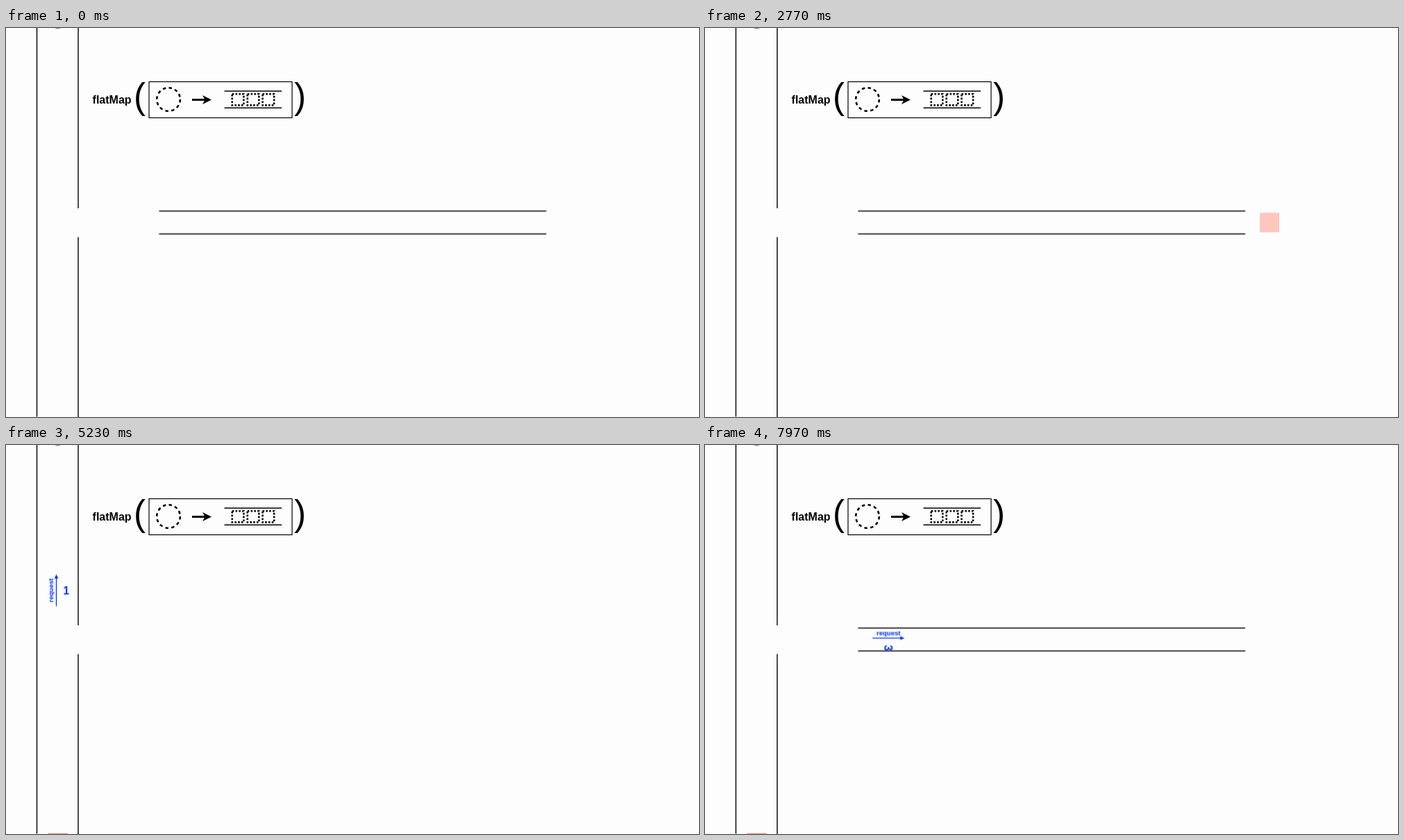
These frames come from a looping animation (998 px wide and 561 px high, 8 s). An HTML page:

```html
<!DOCTYPE html>
<html lang="en">
<head>
<meta charset="utf-8">
<title>flatMap</title>
<style>
  html, body { margin: 0; width: 100%; height: 100%; overflow: hidden; background: #fdfdfd; }
  svg { display: block; width: 998px; height: 561px; }
  text { font-family: "Liberation Sans", Arial, sans-serif; font-weight: bold; font-size: 16px; }
  .line { fill: none; stroke: #000; stroke-width: 1.4; }
  .dash { fill: none; stroke: #000; stroke-width: 2.6; }
  .paren { font-size: 51px; font-weight: normal; }
  .request { fill: #0433ff; text-anchor: middle; opacity: 0; }
  .request path { stroke: #0433ff; stroke-width: 1.3; }
  .request .label { font-size: 9.55px; }
  #square, #circle { opacity: 0; }
</style>
</head>
<body>
<svg viewBox="0 0 998 561">
  <defs>
    <g id="arrow">
      <path d="M0 23V-18" fill="none"/>
      <path d="M0 -23L2.8 -17H-2.8Z" style="stroke:none"/>
    </g>
    <rect id="slot" class="dash" x="0" y="95.2" width="16.6" height="16.2" stroke-dasharray="2.6 2.2"/>
  </defs>

  <path class="line" d="M44.5 0V560.5M104 0V260M104 301.5V561"/>
  <circle cx="74.5" cy="-13.2" r="14" fill="#333"/>

  <text x="124.6" y="109">flatMap</text>
  <text class="paren" x="183.9" y="116.4">(</text>
  <text class="paren" x="415" y="116.4">)</text>
  <rect class="line" x="206" y="77.5" width="206" height="52" style="stroke-width:1.2"/>
  <circle class="dash" cx="234" cy="103" r="16.8" stroke-dasharray="4.4 4.4"/>
  <path d="M268 103.5H288" fill="none" stroke="#000" stroke-width="3"/>
  <path d="M296 103.5L283 110L286.5 103.5L283 97Z"/>
  <path class="line" d="M314.5 91H397M314.5 115.3H397"/>
  <use href="#slot" x="325.7"/>
  <use href="#slot" x="347.7"/>
  <use href="#slot" x="369.5"/>

  <g id="pipe"><path class="line" d="M-278.8 -16.5H278.8M-278.8 16.5H278.8"/></g>
  <rect id="square" x="-14" y="-14" width="28" height="28" fill="#ff2600"/>
  <circle id="circle" r="14" fill="#0433ff"/>
</svg>

<script>
const LOOP = 8000;
const svg = document.querySelector('svg');
const find = id => document.getElementById(id);
const at = (x, y, extra = '') => `translate(${x}px, ${y}px) ${extra}`;

// Steps are [time in ms, value]; the first and last values are held.
function track(el, prop, steps) {
  const full = [[0, steps[0][1]], ...steps, [LOOP, steps.at(-1)[1]]];
  const frames = full.map(([t, v]) => ({ offset: t / LOOP, [prop]: v }));
  el.animate(frames, { duration: LOOP, iterations: Infinity }).startTime = document.timeline.currentTime;
}

function request(count) {
  const g = document.createElementNS('http://www.w3.org/2000/svg', 'g');
  g.setAttribute('class', 'request');
  g.innerHTML = `<use href="#arrow" stroke="#0433ff" stroke-width="1.3"/>
    <text class="label" transform="rotate(-90)" y="-4.4">request</text>
    <text x="14.3" y="6">${count}</text>`;
  return svg.appendChild(g);
}

const side = x => at(x, 278.5, 'rotate(90deg)');
const pipeAt = scale => at(499.2, 280.5, `scale(${scale})`);

const first = request(4);
track(first, 'opacity', [[1250, 0], [1500, 1], [2690, 1], [2710, 0]]);
track(first, 'transform', [[1700, side(156.5)], [2700, side(790.5)]]);

const square = find('square');
track(square, 'opacity', [[2707, 0], [2957, 1]]);
track(square, 'transform', [
  [2962, at(813, 280.5)], [3962, at(74.5, 280.5)],
  [4200, at(74.5, 280.5)], [5200, at(74.5, 574.4)]
]);

const pipe = find('pipe');
track(pipe, 'opacity', [[4185, 1], [4335, 0], [7030, 0], [7180, 1]]);
track(pipe, 'transform', [[4185, pipeAt(1)], [4335, pipeAt(.9)], [7030, pipeAt(.9)], [7180, pipeAt(1)]]);

const upstream = request(1);
track(upstream, 'opacity', [[5150, 0], [5215, 1], [5706, 1], [5720, 0]]);
track(upstream, 'transform', [[5230, at(72.5, 210)], [5706, at(72.5, -26)]]);

const circle = find('circle');
track(circle, 'opacity', [[5700, 0], [5706, 1], [6730, 1], [6980, 0]]);
track(circle, 'transform', [[5706, at(74.5, -14)], [6706, at(74.5, 261)]]);

const second = request(3);
track(second, 'opacity', [[7350, 0], [7600, 1]]);
track(second, 'transform', [[7801, side(156.5)], [8000, side(282.7)]]);
</script>
</body>
</html>
```
